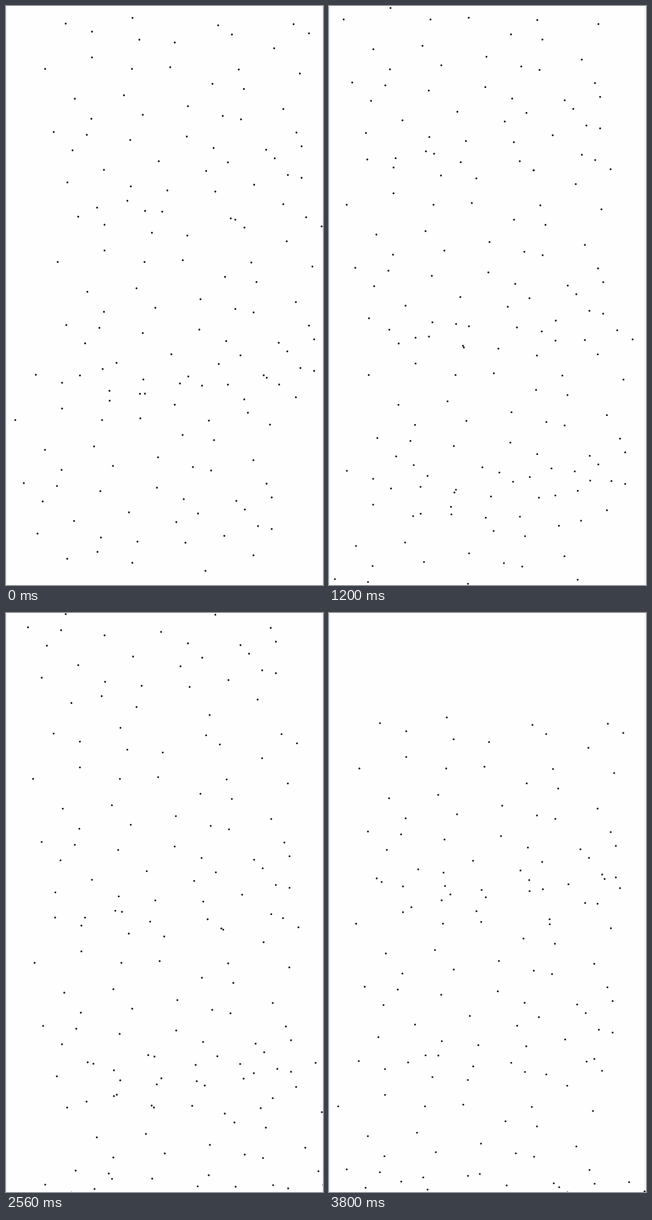
Write an HTML page with a canvas that moves like this. It is 555 by 1010 pixels and loops after 3840 ms.

```html
<!DOCTYPE html>
<html lang="en">
<head>
<meta charset="utf-8">
<title>Falling dots</title>
<style>
  html, body { margin: 0; height: 100%; overflow: hidden; background: #fff; }
  canvas { display: block; }
</style>
</head>
<body>
<canvas id="stage" width="555" height="1010"></canvas>
<script>
const ctx = document.getElementById('stage').getContext('2d');
const LOOP = 3840;
const STEP = 40;

// One cluster of dots; every falling group repeats it. The anchor is the second dot.
const ANCHOR = [150, 44.3];
const DOTS = [
  [104, 30], [150, 44], [150, 89], [221, 20], [233, 58], [295, 63], [371, 33], [395, 49],
  [503, 31], [530, 47], [469, 73], [68, 109], [220, 109], [287, 106], [361, 135], [407, 110],
  [514, 117], [416, 144], [120, 161], [206, 155], [149, 196], [318, 174], [239, 189], [379, 191],
  [411, 197], [485, 179], [83, 219], [141, 224], [217, 233], [316, 227], [508, 220], [116, 251],
  [363, 247], [455, 250], [517, 244], [470, 265], [267, 270], [388, 272], [171, 285], [350, 287],
  [493, 294], [107, 307], [517, 299], [434, 311], [218, 314], [282, 321], [366, 323], [212, 339],
  [159, 351], [485, 345], [273, 358], [401, 372]
];

// Sideways zigzags as [ms, x] corners.
const SWAY = [[0, 0], [969, -27.4], [2812, 24.3], [3800, 0]];

// x and y at time 0, drift and fall in px per ms, zigzag, time of appearance.
const GROUPS = [
  { x: 150, y: 44.5, drift: -0.0138, fall: 0.1976, sway: SWAY, from: 0 },
  { x: 172, y: 381.3, drift: 0, fall: 0.1643, sway: SWAY, from: 0 },
  { x: 97.7, y: 657, drift: 0, fall: 0.1397, sway: SWAY, from: 0 },
  { x: 0, y: -281, drift: 0, fall: 0.1994, from: 420,
    sway: [[400, 134], [1370, 101.5], [3281, 146.5], [3800, 129]] },
  { x: 0, y: -862.6, drift: 0, fall: 0.2812, from: 1600,
    sway: [[1600, 135], [2532, 105], [3800, 134.7]] }
];

function along(keys, t) {
  let i = 1;
  while (i < keys.length - 1 && t > keys[i][0]) i++;
  const [t0, v0] = keys[i - 1], [t1, v1] = keys[i];
  return v0 + (v1 - v0) * (t - t0) / (t1 - t0);
}

function draw(now) {
  // 25 pictures per second, taken from motion running at 30 per second.
  const step = Math.floor((now % LOOP + 0.5) / STEP);
  const t = Math.floor(step * 1.2 + 1e-6) * 1000 / 30;

  ctx.fillStyle = '#fefefe';
  ctx.fillRect(0, 0, 555, 1010);
  ctx.fillStyle = '#eee';
  ctx.fillRect(0, 0, 1.5, 1010);
  ctx.fillRect(553, 0, 1.5, 1010);

  ctx.fillStyle = '#1c1c1c';
  ctx.beginPath();
  for (const g of GROUPS) {
    if (t < g.from) continue;
    const dx = g.x + g.drift * t + along(g.sway, t) - ANCHOR[0] + 0.5;
    const dy = g.y + g.fall * t - ANCHOR[1] + 0.5;
    for (const [x, y] of DOTS) {
      ctx.moveTo(x + dx + 1.7, y + dy);
      ctx.arc(x + dx, y + dy, 1.7, 0, 2 * Math.PI);
    }
  }
  ctx.fill();
}

function tick(now) {
  draw(now);
  requestAnimationFrame(tick);
}
draw(0);
requestAnimationFrame(tick);
</script>
</body>
</html>
```
